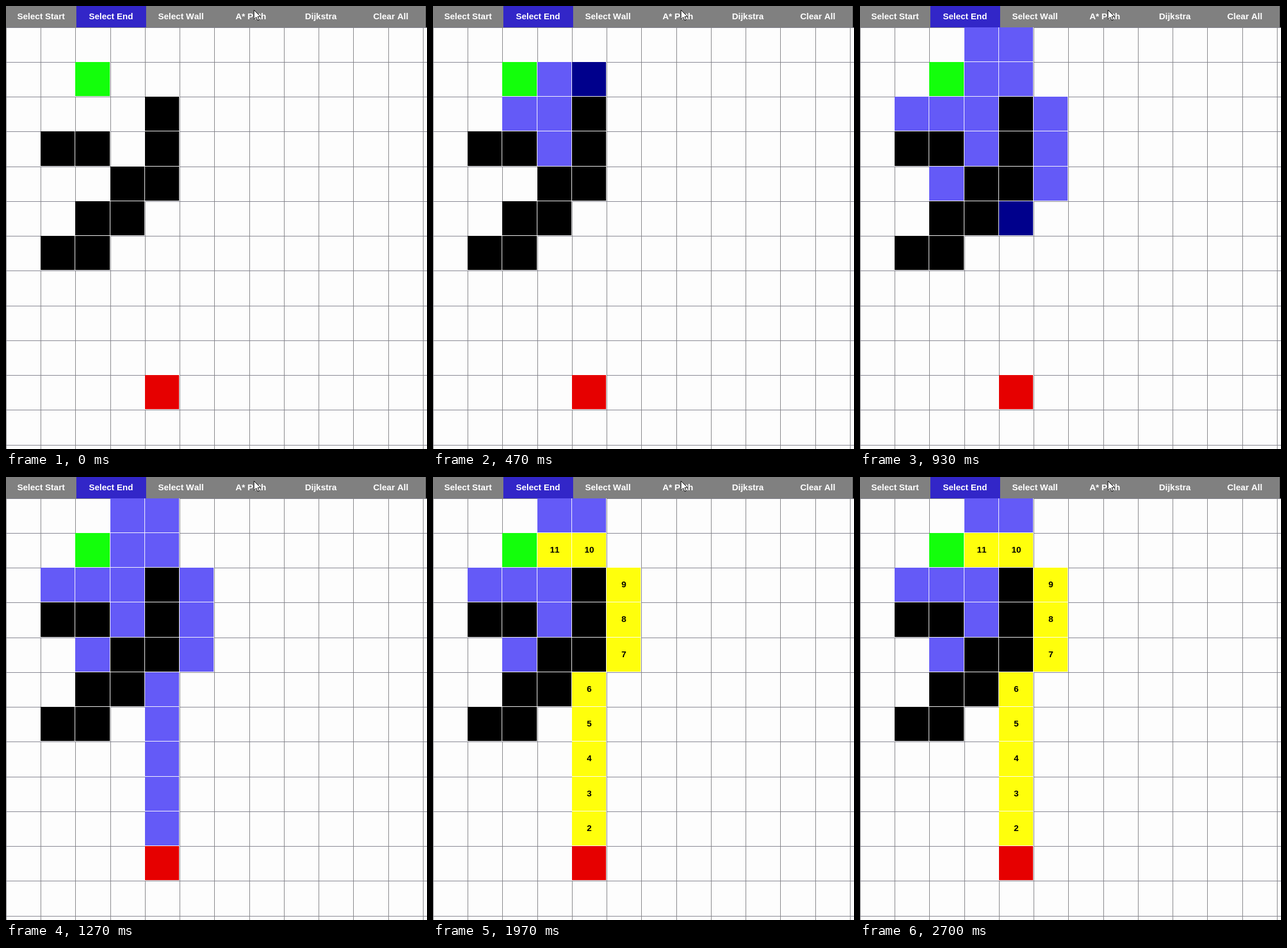
An HTML page with a canvas that plays this animation: 730 px wide and 767 px high, repeating every 2730 ms.

```html
<!DOCTYPE html>
<html lang="en">
<head>
<meta charset="utf-8">
<title>Pathfinding grid</title>
<style>
html, body { margin: 0; width: 100%; height: 100%; overflow: hidden; background: #fdfdfd; }
canvas { display: block; }
</style>
</head>
<body>
<canvas id="stage" width="730" height="767"></canvas>
<script>
const ctx = document.getElementById('stage').getContext('2d');
const W = 730, H = 767, LOOP = 2730;
const PITCH = 60.25, TOP = 37;
const STEP = 56.7, SEARCH_AT = 205, PATH_AT = 1282;
const PAPER = '#fdfdfd';
const COLORS = {
  wall: '#000', start: '#13ff0b', end: '#e60000',
  seen: '#645af7', current: '#00008c', path: '#ffff0c'
};
const labels = ['Select Start', 'Select End', 'Select Wall', 'A* Path', 'Dijkstra', 'Clear All'];

// Cells are written as "column,row".
const walls = '4,2 1,3 2,3 4,3 3,4 4,4 2,5 3,5 1,6 2,6'.split(' ');
const visits = ('3,2 3,3 2,2 3,1 4,1 2,4 1,2 3,0 4,0 5,2 5,3 5,4 ' +
  '4,5 4,6 4,7 4,8 4,9').split(' ');
const route = '4,9 4,8 4,7 4,6 4,5 5,4 5,3 5,2 4,1 3,1'.split(' ');

const colX = c => Math.floor(PITCH * c + 0.25);
const rowY = r => Math.floor(PITCH * r + TOP);

function rect(color, x, y, w, h) {
  ctx.fillStyle = color;
  ctx.fillRect(x, y, w, h);
}

function text(str, x, y, color) {
  ctx.fillStyle = color;
  ctx.fillText(str, x, y);
}

function cellsAt(t) {
  const cells = new Map(walls.map(key => [key, 'wall']));
  cells.set('2,1', 'start').set('4,10', 'end');
  const now = Math.floor((t - SEARCH_AT) / STEP);
  visits.forEach((key, i) => {
    if (i <= now) cells.set(key, i === now ? 'current' : 'seen');
  });
  const shown = Math.floor((t - PATH_AT) / STEP) + 1;
  route.slice(0, Math.max(0, shown)).forEach(key => cells.set(key, 'path'));
  return cells;
}

function drawGrid() {
  for (let i = 0; i <= 12; i++) {
    rect('#808084', colX(i), TOP, 1, H - TOP);
    rect('#80808c', 0, rowY(i), W, 1);
  }
}

// A filled cell covers its left and top lines and leaves a pale edge right and below.
function drawCells(cells) {
  for (const [key, kind] of cells) {
    const [c, r] = key.split(',').map(Number);
    const x = colX(c), y = rowY(r);
    const w = colX(c + 1) - x, h = rowY(r + 1) - y;
    rect(PAPER, x, y, w, h);
    rect(COLORS[kind], x, y, w - 1, h - 1);
    if (kind === 'path') text(route.indexOf(key) + 2, x + 30, y + 34, '#000');
  }
}

function drawToolbar() {
  rect('#000', 728, 0, 2, TOP);
  rect('#808080', 0, 0, 728, TOP);
  rect('#3226c8', 122, 0, 121, TOP);
  labels.forEach((label, i) => text(label, 60.7 + 121.3 * i, 23, '#fff'));
}

function drawPointer() {
  ctx.beginPath();
  [[0, 0], [0, 16], [4, 12.5], [6.5, 18], [9, 17], [6.5, 11.5], [11, 11]]
    .forEach(([x, y]) => ctx.lineTo(430 + x, 7 + y));
  ctx.closePath();
  ctx.fillStyle = '#fff';
  ctx.fill();
  ctx.strokeStyle = '#000';
  ctx.lineWidth = 1;
  ctx.stroke();
}

function frame() {
  const t = performance.now() % LOOP;
  rect(PAPER, 0, 0, W, H);
  ctx.font = 'bold 15px "Liberation Sans", Arial, sans-serif';
  ctx.textAlign = 'center';
  ctx.fontKerning = 'none';
  drawGrid();
  drawCells(cellsAt(t));
  drawToolbar();
  drawPointer();
  requestAnimationFrame(frame);
}
frame();
</script>
</body>
</html>
```
